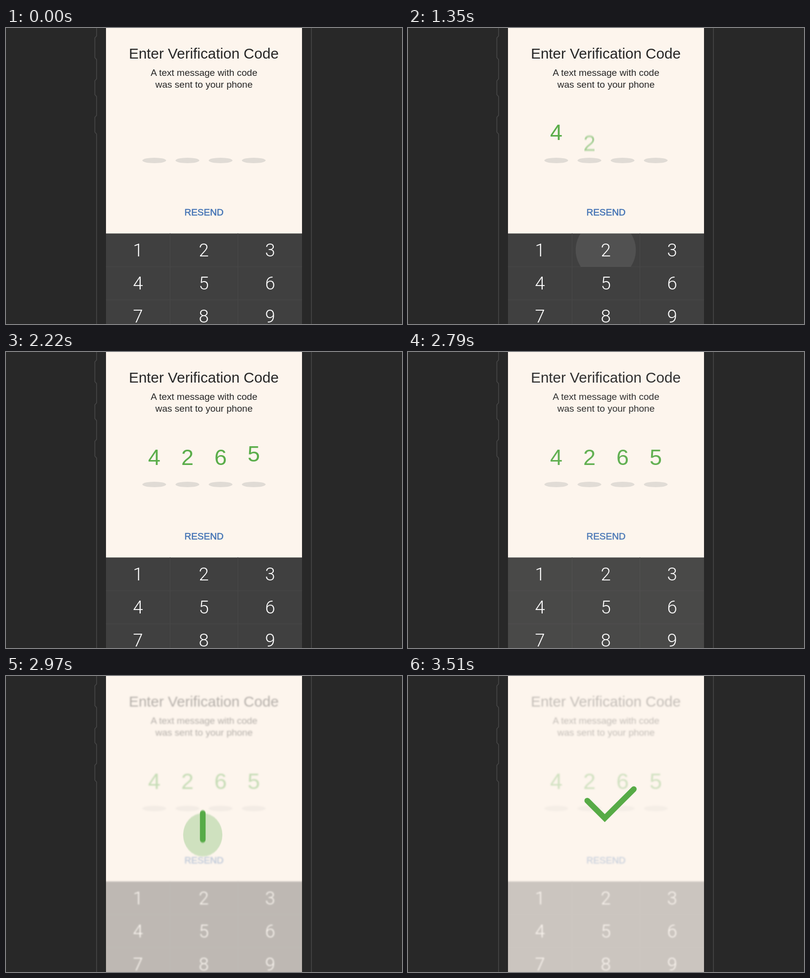
An HTML page for the animation above (4290 ms loop, 800x600 px).

```html
<!DOCTYPE html>
<html lang="en">
<head>
<meta charset="utf-8">
<title>Verification code</title>
<style>
  html, body { margin: 0; height: 100%; overflow: hidden; background: #282828; }
  svg { display: block; width: 800px; height: 600px; }
  text { font-family: "Liberation Sans", Arial, sans-serif; text-anchor: middle; fill: #262626; }
  #keys text { font: 300 36.5px Roboto, Inter, sans-serif; fill: #fff; }
  #digits text { font-size: 45px; fill: #5aad4a; }
  .resend { font-size: 19px; fill: #4272b4; stroke: #4272b4; stroke-width: .5; }
</style>
</head>
<body>
<svg viewBox="0 0 800 600">
  <defs>
    <clipPath id="screen"><path d="M202 0H598V600H202Z"/></clipPath>
    <filter id="smear" filterUnits="userSpaceOnUse" x="200" y="100" width="400" height="500">
      <feGaussianBlur stdDeviation="0"/>
    </filter>
  </defs>
  <path fill="none" stroke="#484848" stroke-width="1.5"
    d="M183 0V16L179.500 20V60L183 64V103L179.500 107V135L183 139V177L179.500 181V211L183 215V600M617 0V600"/>
  <g clip-path="url(#screen)">
    <path fill="#fdf5ed" d="M202 0H598V600H202Z"/>
    <g id="content">
      <path fill="#fdf5ed" d="M170 -30H630V630H170Z"/>
      <text x="399.500" y="62" font-size="29.600">Enter Verification Code</text>
      <g font-size="19">
        <text x="400" y="96.500">A text message with code</text>
        <text x="400" y="120.500">was sent to your phone</text>
      </g>
      <text class="resend" x="400" y="380">RESEND</text>
      <path fill="#404040" d="M170 416.500H630V630H170Z"/>
      <path fill="none" stroke="#494949" d="M331.500 416V630M468.500 416V630M170 484H630M170 551H630"/>
      <g id="presses" fill="#fff"></g>
      <g id="keys"></g>
      <g id="slots" fill="#e0dbd5"></g>
      <g id="digits"></g>
    </g>
    <g id="success" filter="url(#smear)">
      <ellipse id="disc" cx="397.500" fill="#57ab46"/>
      <path id="mark" fill="none" stroke="#57ab46" stroke-width="11.500" stroke-linecap="round"/>
    </g>
  </g>
</svg>
<script>
const LOOP = 4290, STEP = 30;
const columns = [266.5, 399.5, 533.5], edges = [202, 331.5, 468.5, 598];
const code = [
  { digit: 4, press: 990, rise: 1020 },
  { digit: 2, press: 1290, rise: 1320 },
  { digit: 6, press: 1590, rise: 1620 },
  { digit: 5, press: 1890, rise: 2010 },
];
const $ = id => document.getElementById(id);
const clamp = v => Math.max(0, Math.min(1, v));
const span = (t, start, length) => clamp((t - start) / length);
const mix = (a, b, p) => a + (b - a) * p;
const easeOut = (p, power) => 1 - (1 - p) ** power;
const set = (node, attrs) => {
  for (const name in attrs) node.setAttribute(name, attrs[name]);
  return node;
};
const add = (parent, tag, attrs, text = '') => {
  const node = set(document.createElementNS('http://www.w3.org/2000/svg', tag), attrs);
  node.textContent = text;
  return parent.appendChild(node);
};

for (let n = 1; n <= 9; n++) {
  add($('keys'), 'text', { x: columns[(n - 1) % 3], y: 463 + 67 * Math.floor((n - 1) / 3) }, n);
}
const defs = document.querySelector('defs');
code.forEach((item, i) => {
  const x = 299.5 + 67 * i, col = (item.digit - 1) % 3, row = Math.floor((item.digit - 1) / 3);
  add($('slots'), 'ellipse', { cx: x, cy: 268.5, rx: 24, ry: 5.5 });
  add(add(defs, 'clipPath', { id: 'cell' + i }), 'rect',
    { x: edges[col], y: 417 + 67 * row, width: edges[col + 1] - edges[col], height: 67 });
  item.spot = add($('presses'), 'circle',
    { cx: columns[col], cy: 450 + 67 * row + (row ? 1 : 0), 'clip-path': `url(#cell${i})` });
  const blur = add(defs, 'filter', { id: 'blur' + i, x: '-50%', y: '-50%', width: '200%', height: '200%' });
  item.blur = add(blur, 'feGaussianBlur', { stdDeviation: 0 });
  item.text = add($('digits'), 'text', { x }, item.digit);
});

function drawCode(t) {
  code.forEach((item, i) => {
    const held = t - item.press;
    set(item.spot, {
      r: mix(51.5, 62, easeOut(clamp(held / 90), 2)),
      opacity: held < 0 ? 0 : 0.1 * clamp(Math.min((held + 45) / 120, (150 - held) / 60)),
    });
    const age = t - item.rise;
    const offset = age < 150 ? mix(28, -10, clamp(age / 150)) : -10 * (1 - span(age, 150, 450)) ** 3;
    const moving = age < 150;
    set(item.blur, { stdDeviation: `0 ${moving ? 1.8 * (1 - clamp(age / 150)) : 0}` });
    set(item.text, { y: 229 + offset, opacity: clamp(age / 60) });
    item.text.style.filter = moving ? `url(#blur${i})` : 'none';
  });
}

function drawSuccess(t) {
  const fade = span(t, 2775, 215);
  $('content').style.opacity = 1 - 0.74 * fade;
  $('content').style.filter = fade ? `blur(${1.8 * fade}px)` : 'none';

  const rise = easeOut(span(t, 2835, 330), 2), cy = mix(430, 264, rise);
  const leave = span(t, 3190, 110), radius = mix(12, 54.5, rise) * (1 - 0.4 * leave);
  set($('disc'), {
    cy, rx: radius, ry: radius * mix(1.3, 1, rise),
    opacity: 0.27 * clamp(rise * 3) * (1 - leave),
  });

  // The upright bar opens into two arms around its lower end.
  const open = span(t, 3210, 300), swing = Math.PI / 4;
  const long = swing * easeOut(open, 2), short = swing * easeOut(open, 4);
  const length = mix(0, 83, rise), stub = mix(length, 50, easeOut(open, 2));
  const x = 397.5, y = cy + 10 + 14 * easeOut(open, 3) + 3 * Math.sin(Math.PI * open);
  const left = `${x - stub * Math.sin(short)} ${y - stub * Math.cos(short)}`;
  const right = `${x + length * Math.sin(long)} ${y - length * Math.cos(long)}`;
  set($('mark'), {
    d: open ? `M${left}L${x} ${y}L${right}` : `M${x} ${y}L${right}`,
    'stroke-linejoin': open > 0.3 ? 'miter' : 'round',
    opacity: clamp(rise * 2.2),
  });
  const smear = 1 - clamp(rise * 1.1);
  set($('smear').firstElementChild, { stdDeviation: `${1.5 * smear} ${5 * smear}` });
  $('success').style.display = rise ? '' : 'none';
}

function frame() {
  const now = performance.now() % LOOP, t = now - now % STEP;
  drawCode(t);
  drawSuccess(t);
  requestAnimationFrame(frame);
}
frame();
</script>
</body>
</html>
```
